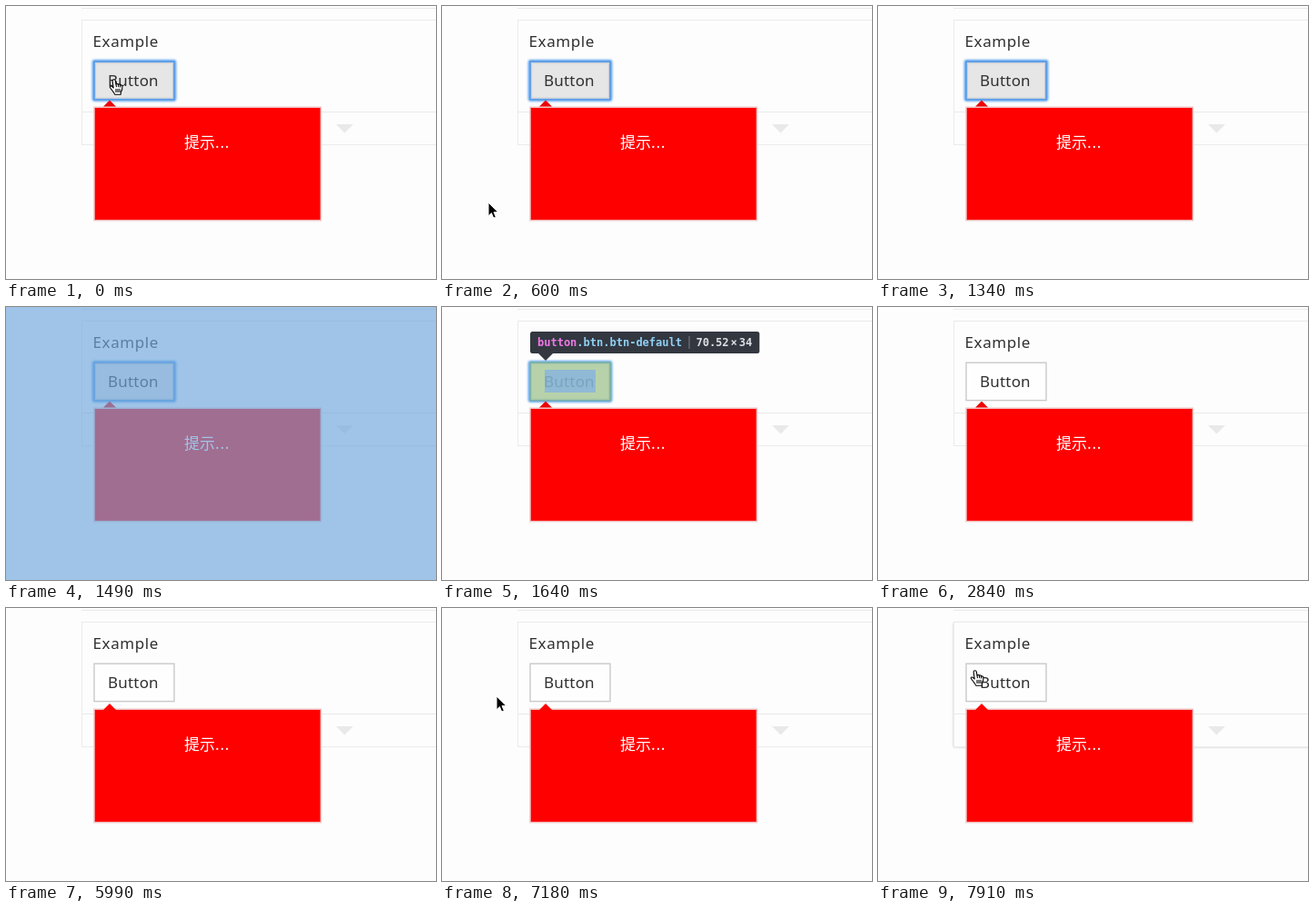
Animation, 473 px wide and 300 px high, one loop 8000 ms. Source, as an HTML page:

```html
<!DOCTYPE html>
<html lang="en">
<head>
<meta charset="utf-8">
<title>Popover arrow</title>
<style>
  html, body { margin: 0; width: 100%; height: 100%; overflow: hidden; background: #fdfdfd; }
  svg { display: block; width: 473px; height: 300px; }
  .label { font: 17px "Noto Sans", "Open Sans", sans-serif; fill: #303030; }
  .tip { font: 12px "Noto Sans CJK SC", "Noto Sans CJK", sans-serif; font-size: 17px; fill: #fff; }
  .code { font: bold 12px "DejaVu Sans Mono", monospace; fill: #dcdee2; }
  .tag { fill: #ee78e6; }
  .cls { fill: #8fd0f5; }
</style>
</head>
<body>
<svg viewBox="0 0 473 300">
  <defs>
    <filter id="glow" x="-20%" y="-30%" width="140%" height="160%"><feGaussianBlur stdDeviation="1"/></filter>
    <filter id="soft" x="-5%" y="-10%" width="110%" height="120%"><feGaussianBlur stdDeviation="1.5"/></filter>
  </defs>

  <rect width="473" height="300" fill="#fdfdfd"/>
  <path d="M83 2.5H473" stroke="#e9e9e9"/>
  <rect id="shade" x="83" y="16.5" width="420" height="136.5" fill="#000" filter="url(#soft)"/>
  <rect x="83.5" y="15.5" width="420" height="137" fill="#fdfdfd" stroke="#ebebeb"/>
  <path d="M83 116.5H473" stroke="#e9e9e9"/>
  <path d="M363 130h19l-9.5 9.5z" fill="#e9e9e9"/>
  <text class="label" x="95.5" y="45" letter-spacing=".6">Example</text>

  <g id="plain">
    <rect x="97" y="61.2" width="88" height="41.4" fill="#fefefe" stroke="#c9c9c9" stroke-width="1.4"/>
  </g>
  <g id="focus">
    <rect x="96.5" y="60.7" width="89" height="42.3" rx="1" fill="none" stroke="#5aa2f0" stroke-width="3.6" filter="url(#glow)"/>
    <rect x="97" y="61.2" width="88" height="41.4" fill="#e6e6e6" stroke="#5b9ce6" stroke-width="1.8"/>
    <rect x="98.6" y="62.8" width="84.8" height="38.2" fill="none" stroke="#c9ced4"/>
  </g>
  <text class="label" x="112" y="88" letter-spacing=".2">Button</text>
  <g id="boxModel">
    <rect x="96" y="60" width="90" height="43.5" fill="#93c47d" opacity=".55"/>
    <rect x="113" y="69" width="56" height="25" fill="#82b0e6" opacity=".72"/>
  </g>

  <rect x="97" y="111.2" width="249.4" height="124.4" fill="#f00" stroke="#f0c4c4" stroke-width="1.5"/>
  <path id="arrow"/>
  <text class="tip" x="196" y="155.5">提示<tspan letter-spacing=".7">...</tspan></text>

  <path id="diamond" d="M114 104l7 7-7 7-7-7z" fill="#6fa8dc" opacity=".66"/>
  <g id="tips"></g>
  <rect id="veil" width="473" height="300" fill="#6fa8dc" opacity=".66"/>

  <g id="pointer">
    <path d="M1 1V15.7L4.4 12.5 6.7 18 9.3 16.9 7 11.6H11.8Z" fill="#000" stroke="#fff"/>
  </g>
  <g id="hand" stroke="#000" stroke-width="1.1" stroke-linejoin="round" stroke-linecap="round">
    <path fill="#fff" d="M4.2 3C3.9 1.4 4.6.7 5.6.7 6.6.7 7.2 1.3 7.4 2.3L8 6C8.5 5.2 10 5.2 10.4 6.3 11 5.6 12.3 5.8 12.6 7 13.6 6.4 14.8 7 14.9 8.3 15.2 11 14.4 13 13.4 14.6L13.2 17.2H6.6C6.4 15.4 4.4 13.6 3.2 12 2.4 11 1 9.6 1.2 8.6 1.6 7.6 3 7.8 4 8.8L5.2 10Z"/>
    <path fill="none" d="M8 6L8.4 8.6M10.4 6.3L10.7 8.8M12.6 7L12.7 9M8 11.4V14.4M10 11.4V14.4M12 11.4V14.4"/>
  </g>
</svg>
<script>
const LOOP = 8000;
const $ = id => document.getElementById(id);
const show = (id, on) => $(id).setAttribute("display", on ? "inline" : "none");
const between = (t, a, b) => t >= a && t < b;

// Pointer stops: time, x, y, shape; no shape means hidden.
const stops = [
  [0, 113, 80, "hand"], [150, 107, 137, "pointer"], [300, 95, 76, "hand"],
  [450, 117, 199, "pointer"], [600, 50, 215, "pointer"], [750, 80, 213, "pointer"],
  [900, 92, 241, "pointer"], [1040, 140, 255, "pointer"], [1190, 468, 245, "pointer"],
  [1340], [6740, 214, 199, "pointer"], [6880], [7030, -11.5, 75, "pointer"],
  [7180, 59, 96, "pointer"], [7330, 131, 107, "pointer"], [7470, 106, 147, "pointer"],
  [7620, 93, 94, "pointer"], [7760, 101, 152, "pointer"], [7910, 101, 68, "hand"]
];

function inspector(id, x, y, tag, cls, w, h) {
  const advance = 7.225;
  const rule = x + 16 + (tag + cls).length * advance;
  const size = rule + 7.5;
  const times = size + w.length * advance + 2;
  const tall = times + advance + 2;
  const right = tall + h.length * advance + 8;
  const base = y + 16;
  return `<g id="${id}">
    <path d="M${x + 9} ${y + 24}h16l-8 8z" fill="#333740"/>
    <rect x="${x}" y="${y}" width="${right - x}" height="24" rx="2.5" fill="#333740"/>
    <text class="code" x="${x + 8}" y="${base}"><tspan class="tag">${tag}</tspan><tspan class="cls">${cls}</tspan></text>
    <path d="M${rule} ${y + 5}v14" stroke="#7b7f87"/>
    <text class="code" x="${size}" y="${base}">${w}</text>
    <text class="code" x="${times}" y="${base}">×</text>
    <text class="code" x="${tall}" y="${base}">${h}</text>
  </g>`;
}

$("tips").innerHTML =
  inspector("buttonTip", 97, 27, "button", ".btn.btn-default", "70.52", "34") +
  inspector("arrowTip", 106, 70, "div", ".rc-popover-arrow", "11.31", "11.31");

function render(t) {
  const [, x, y, shape] = stops.filter(s => s[0] <= t).pop();
  for (const id of ["pointer", "hand"]) {
    show(id, id === shape);
    if (id === shape) $(id).setAttribute("transform", `translate(${x} ${y})`);
  }

  const focused = t < 2390;
  show("focus", focused);
  show("plain", !focused);
  show("veil", between(t, 1490, 1640));
  show("boxModel", between(t, 1640, 1790));
  show("buttonTip", between(t, 1640, 1790));
  show("diamond", between(t, 1790, 2840));
  show("arrowTip", between(t, 1790, 2840));

  const lowered = t >= 5990;
  $("arrow").setAttribute("d", lowered ? "M114 105l7 7h-14z" : "M114 103.5l7 7h-14z");
  $("arrow").setAttribute("fill", lowered ? "#f00" : "#ec0505");

  const hover = Math.min(1, Math.max(0, (t - 7330) / 450));
  $("shade").setAttribute("opacity", 0.2 * hover);
}

const start = performance.now();
function tick() {
  render((performance.now() - start) % LOOP);
  requestAnimationFrame(tick);
}
tick();
</script>
</body>
</html>
```
